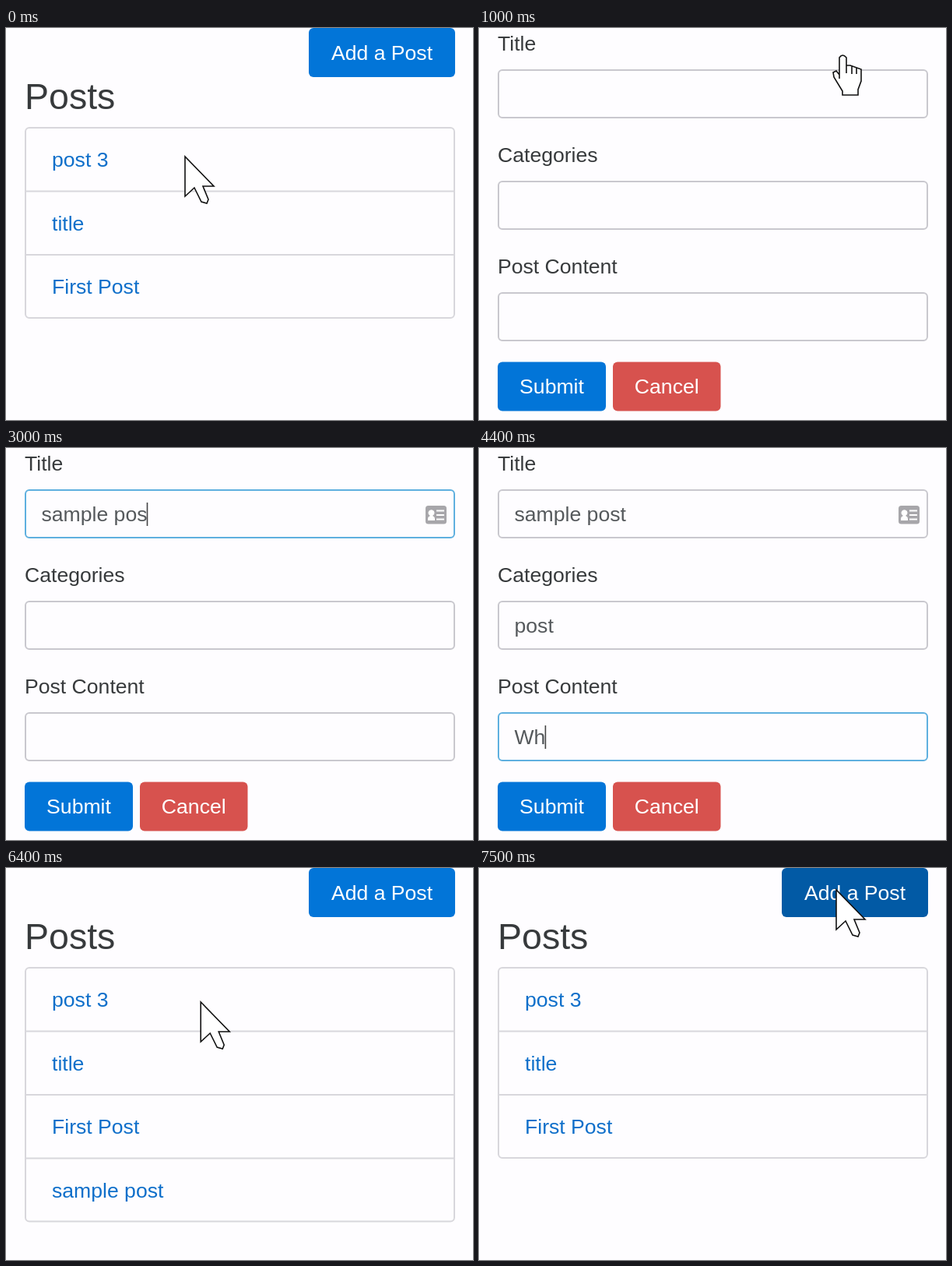
Write an HTML page that moves like this. It is 600x503 px and loops after 7.7 s.

```html
<!DOCTYPE html>
<html lang="en">
<head>
<meta charset="utf-8">
<title>Posts</title>
<style>
  html, body { margin: 0; width: 100%; height: 100%; overflow: hidden; background: #fefdff; }
  svg { display: block; font: 26.6px "Liberation Sans", Arial, sans-serif; fill: #373a3c; }
</style>
</head>
<body>
<svg id="stage" width="600" height="503" viewBox="0 0 600 503"></svg>
<script>
const LOOP = 7700, STEP = 100, ROW = 81.5, FIELD = 143;
const BLUE = '#0275d8', DARK_BLUE = '#025aa5', RED = '#d7524e', DARK_RED = '#c9302c';
const LINK = '#0f6fca', LINE = '#d8d7dc';
const stage = document.getElementById('stage');
const pen = document.createElement('canvas').getContext('2d');
pen.font = '26.6px "Liberation Sans", Arial, sans-serif';

const text = (x, y, s, attrs = '') => `<text x="${x}" y="${y - 0.5}" ${attrs}>${s}</text>`;
const heading = (y, s) => text(24, y, s, 'font-size="46.5"');
const line = (d, color, width = 2) => `<path d="${d}" stroke="${color}" stroke-width="${width}"/>`;
const frame = (y, h, color) =>
  `<rect x="25" y="${y + 1}" width="551" height="${h - 2}" rx="5" fill="none" stroke="${color}" stroke-width="2"/>`;
const button = (x, y, w, s, color) =>
  `<rect x="${x}" y="${y}" width="${w}" height="63" rx="6" fill="${color}"/>` +
  text(x + w / 2, y + 41, s, 'fill="#fff" text-anchor="middle"');

const progress = (t, from, to) => Math.min(1, Math.max(0, (t - from) / (to - from)));
const typed = (s, t, from, to) => s.slice(0, Math.round(s.length * progress(t, from, to)));

// The first try at the content is a typo, retyped after a pause
const fields = [
  { label: 'Title', focus: 1900, value: t => typed('sample post', t, 2100, 3100) },
  { label: 'Categories', focus: 3500, value: t => typed('post', t, 3500, 3900) },
  { label: 'Post Content', focus: 4200, value: t =>
    t < 4700 ? typed('Wh', t, 4200, 4400) : typed('Write here', t, 4600, 5200) }
];

const card = `<rect x="539" y="74" width="27" height="23.5" rx="3.5" fill="#a7a6aa"/>` +
  line('M553 80.5h10m-10 5.5h10m-10 5.5h10', '#fff') +
  '<path d="M542 93v-2q0-3 3-4a4 4 0 1 1 3 0q3 1 3 4v2z" fill="#fff"/>';

const shapes = {
  arrow: 'M0 0V51L12 40L21 58L28 60L30 55L23 38H37Z',
  hand: 'M-4 30V3Q0 -3 5 3V13H10L24 18V33L20 44V51H0V46L-11 28L-12 22L-8 20L-4 25M5 13V23M12 14V24M18 16V24',
  beam: 'M-9 -25H9M-9 25H9M0 -25V25'
};

// Each move ends over something that sets the pointer shape
const moves = [
  { from: 100, to: 400, x: 467, y: 35, shape: 'hand' },
  { from: 1400, to: 1800, x: 300, y: 88, shape: 'beam' },
  { from: 6300, to: 6600, x: 108, y: 412, shape: 'hand' },
  { from: 6800, to: 7100, x: 459, y: 28, shape: 'hand' }
];

function cursor(t) {
  if (t >= 2200 && t < 6400) return '';
  let x = 230, y = 165, shape = 'arrow';
  for (const m of moves.filter(m => t > m.from)) {
    const u = progress(t, m.from, m.to), e = u * u * (3 - 2 * u);
    x += (m.x - x) * e;
    y += (m.y - y) * e;
    shape = u < 1 || t >= 7300 ? 'arrow' : m.shape;
  }
  return `<g transform="translate(${x} ${y})" fill="#fff">${line(shapes[shape], '#111', 1.6)}</g>`;
}

function list(t) {
  const rows = ['post 3', 'title', 'First Post'];
  if (t >= 6000 && t < 6800) rows.push('sample post');
  const hover = t >= 400 && t < 700 || t >= 7400;
  return button(389, 0, 188, 'Add a Post', hover ? DARK_BLUE : BLUE) + heading(104.5, 'Posts') +
    frame(127, 1.5 + rows.length * ROW, LINE) +
    rows.map((s, i) => {
      const over = i === 3 && t >= 6600;
      return (i ? line(`M25 ${128 + i * ROW}H576`, LINE) : '') +
        text(59, 178.5 + i * ROW, s, over ? 'fill="#014c8c" text-decoration="underline"' : `fill="${LINK}"`);
    }).join('');
}

function form(t) {
  const active = fields.findLast(f => t >= f.focus);
  return fields.map((f, i) => {
    const y = i * FIELD, value = f.value(t), on = f === active;
    const end = 45.5 + pen.measureText(value).width;
    return text(24, y + 29, f.label) + frame(y + 53, 63, on ? '#5fb0df' : '#c9c8ce') +
      text(45.5, y + 94.5, value, 'fill="#55595c"') +
      (on && t < 5800 ? line(`M${end} ${y + 70}v30`, '#444', 1.6) : '');
  }).join('') + (t >= 1200 ? card : '') +
    button(24, 428.5, 139, 'Submit', BLUE) + button(172, 428.5, 138.5, 'Cancel', RED);
}

const post = t => text(24, 29, 'Back To Index', `fill="${LINK}"`) +
  button(381.5, 0, 195.5, 'Delete Post', t >= 7100 ? DARK_RED : RED) +
  heading(81.5, 'sample post') + text(24, 127, 'Categories: post') + text(24, 175, 'Write here');

function view(t) {
  if (t >= 700 && t < 6000) return form(t);
  return t >= 6800 && t < 7300 ? post(t) : list(t);
}

let start, last;
function draw(now) {
  start ??= now;
  const t = Math.floor((now - start) % LOOP / STEP) * STEP;
  if (t !== last) stage.innerHTML = view(t) + cursor(t);
  last = t;
  requestAnimationFrame(draw);
}
requestAnimationFrame(draw);
</script>
</body>
</html>
```
